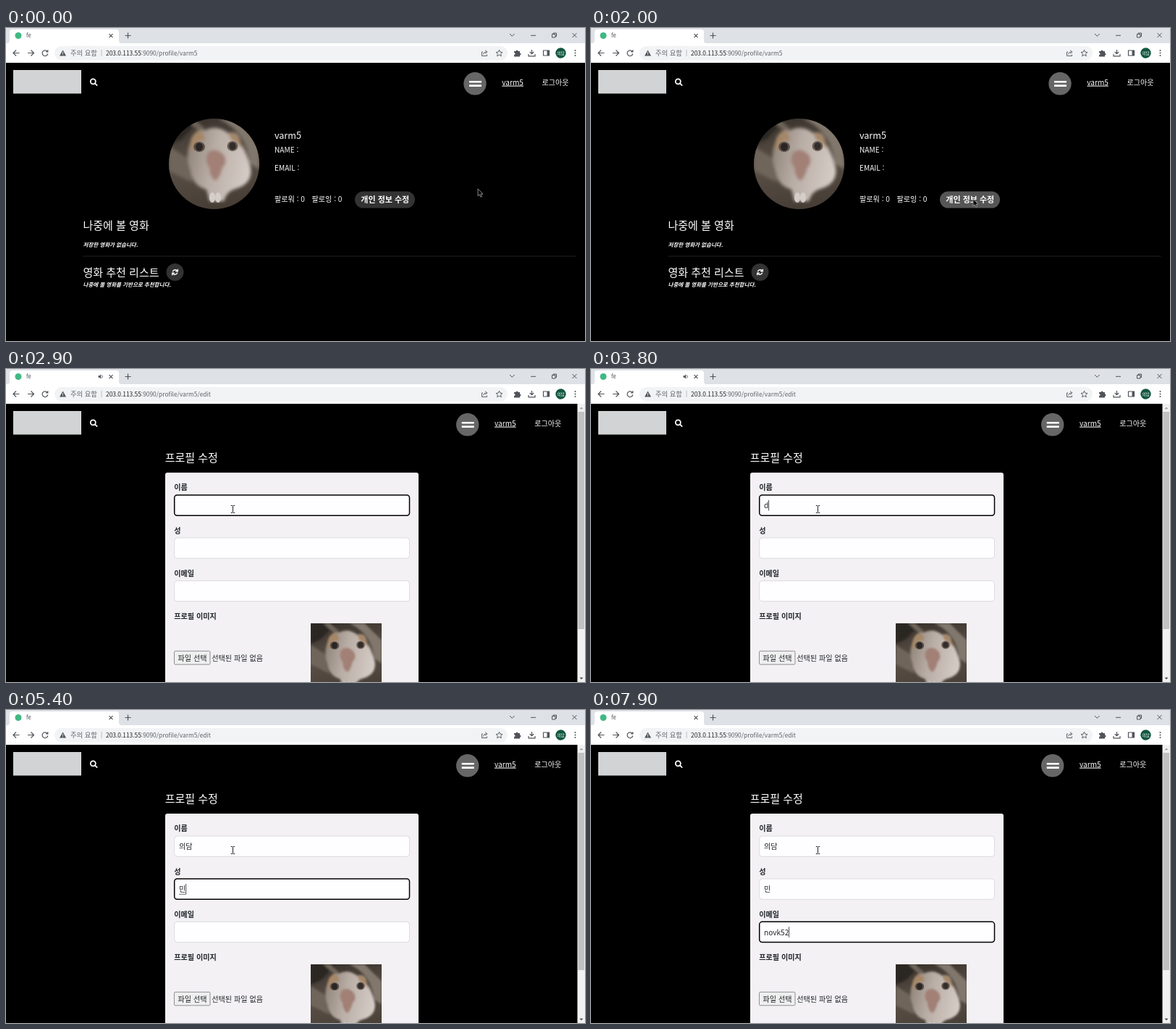
An HTML page for the animation above (8 s loop, 800 by 432 pixels).

```html
<!DOCTYPE html>
<html lang="ko">
<head>
<meta charset="utf-8">
<title>Profile edit</title>
<style>
  html, body { margin: 0; width: 100%; height: 100%; overflow: hidden; background: #000; }
  svg { display: block; width: 100vw; height: 100vh; }
  text { font: 10.1px "Noto Sans CJK KR", "Noto Sans CJK JP", "Noto Sans", sans-serif; white-space: pre; }
  .page { fill: #fff; }
  .page text { font-weight: 500; }
  .page .h { font-size: 15px; }
  .page .name { font-size: 12.6px; }
  .page .note { font-size: 7.5px; font-style: italic; font-weight: 700; }
  .page .btn { font-size: 11px; font-weight: 700; }
  .form { fill: #212529; }
  .form .label { font-weight: 700; }
  .ui { fill: none; stroke: #50545a; stroke-width: 1.2; }
  .ui .soft { stroke: #b0b3b7; }
  .ui .dot { fill: #50545a; stroke: none; }
  .field { fill: #fefdff; stroke: #d3d3d7; stroke-width: .8; }
  .field.on { stroke: #000; stroke-width: 1.5; }
</style>
</head>
<body>
<svg viewBox="0 0 800 432" preserveAspectRatio="none">
  <defs>
    <linearGradient id="room" x1=".3" y1="0" x2=".5" y2="1">
      <stop offset="0" stop-color="#3a332d"/>
      <stop offset=".45" stop-color="#5a5047"/>
      <stop offset="1" stop-color="#463d35"/>
    </linearGradient>
    <linearGradient id="fur" x1="0" y1=".35" x2="1" y2=".6">
      <stop offset="0" stop-color="#93877d"/>
      <stop offset=".4" stop-color="#b9aea6"/>
      <stop offset="1" stop-color="#d6cdc7"/>
    </linearGradient>
    <filter id="soft" x="-20%" y="-20%" width="140%" height="140%"><feGaussianBlur stdDeviation="2"/></filter>
    <clipPath id="round"><circle cx="62.5" cy="62.5" r="62.5"/></clipPath>
    <clipPath id="square"><path d="M0 0h125v125H0z"/></clipPath>

    <g id="photo">
      <path fill="url(#room)" d="M0 0h125v125H0z"/>
      <g filter="url(#soft)">
        <path fill="#81776c" d="M68 0Q108 18 112 62L125 70V30L95 0z"/>
        <path fill="#6f655a" d="M0 38L28 56L32 88L0 72z"/>
        <path fill="#2c2621" d="M0 0H44L18 28L0 36z"/>
        <path fill="#6f655a" d="M22 0L42 18L50 14L34 0z"/>
        <path fill="url(#fur)" d="M30 32Q34 14 50 16Q66 8 82 20Q97 16 99 34Q108 48 113 68Q116 90 92 97Q80 100 76 114H56L52 98Q32 92 30 72Q22 52 30 32z"/>
        <path fill="#a58768" d="M29 44Q28 22 42 17Q50 20 50 30Q38 30 36 42zM82 20Q98 16 101 42Q96 34 86 30z"/>
        <path fill="#a28076" d="M54 47Q64 38 76 50Q82 60 74 68Q70 84 64 86Q56 80 56 68Q48 58 54 47z"/>
      </g>
      <ellipse cx="42" cy="39" rx="8" ry="7" fill="#5b514a"/>
      <ellipse cx="88" cy="38" rx="7.5" ry="7" fill="#6b5f57"/>
      <ellipse cx="42" cy="39" rx="5" ry="5.5" fill="#2b2623"/>
      <ellipse cx="88" cy="38" rx="4.8" ry="5.2" fill="#332d2a"/>
      <ellipse cx="60" cy="109" rx="4" ry="7" fill="#d5cec8"/>
      <ellipse cx="68" cy="109" rx="4" ry="7" fill="#d5cec8"/>
    </g>
  </defs>

  <!-- browser window -->
  <path fill="#dee1e6" d="M0 0h800v21H0z"/>
  <path fill="#fff" d="M0 21H2Q5 21 5 17V6Q5 2 9 2H152Q156 2 156 6V17Q156 21 159 21H800V48H0z"/>
  <rect x="67" y="25" width="626" height="19.5" rx="9.7" fill="#f1f3f4"/>
  <circle cx="17" cy="10.5" r="4.5" fill="#41b883"/>
  <text x="28" y="13.3" fill="#45494d" style="font-size:7.6px">fe</text>
  <g class="ui">
    <path d="M142.500 8.200l5 5m0-5l-5 5M168.500 6.500v8m-4-4h8"/>
    <path stroke-width="1" d="M696 8l3.300 3.300L702.600 8M725 10.300h7M754.500 8.500h4.500v4.500h-4.500zM756 8.500V7h4.500v4.500H759M782.500 7l6 6m0-6l-6 6"/>
    <path d="M18.500 34.500h-8.500m4-4l-4 4l4 4M57 32.200A3.900 3.900 0 1 0 57.800 35.500M57.800 30.300v2.600h-2.600M30 34.500h8.500m-4-4l4 4l-4 4"/>
    <path class="dot" d="M78.500 30.500L83 38.500H74z"/>
    <path stroke="#f1f3f4" stroke-width="1" d="M78.500 33.300v2.300m0 .7v1"/>
    <path class="soft" stroke-width=".8" d="M132 30v9"/>
    <path stroke-width=".9" d="M659 33h-1.500v5.500h7V36.500M659.500 36.500q.5-3.500 4-3.500m-1.500-2.200l3 2.200l-3 2.200"/>
    <path stroke-width=".9" d="M681.500 30.200l1.300 3l3.200.3l-2.400 2.100l.7 3.200l-2.800-1.700l-2.800 1.700l.7-3.200l-2.400-2.100l3.200-.3z"/>
    <path class="dot" d="M702 32h2.500a1.500 1.500 0 0 1 3 0h2.500v2.500a1.500 1.500 0 0 1 0 3V39.500h-8v-2.500a1.500 1.500 0 0 0 0-3z"/>
    <path d="M726.500 30v5.500m-2.700-2.500l2.700 2.700l2.700-2.700M722 36v2.800h9V36"/>
    <path d="M742.500 31h8v7h-8z"/>
    <path class="dot" d="M747.500 31h3v7h-3z"/>
    <g class="dot"><circle cx="786.500" cy="31" r="1"/><circle cx="786.500" cy="34.500" r="1"/><circle cx="786.500" cy="38" r="1"/></g>
    <g id="sound">
      <path class="dot" d="M127.500 9.200h1.700l2-1.900v6.400l-2-1.900h-1.700z"/>
      <path stroke-width=".9" d="M132.500 8.500q1.800 2 0 4"/>
    </g>
  </g>
  <circle cx="766.500" cy="34.500" r="7.200" fill="#12573f"/>
  <text x="766.500" y="36.700" fill="#fff" text-anchor="middle" style="font-size:5.800px">의담</text>
  <text x="89" y="38" fill="#5f6368" style="font-size:9.300px">주의 요함</text>
  <text x="138" y="37.700" fill="#5f6368" style="font-size:8.400px"><tspan fill="#202124">203.0.113.55</tspan>:9090/profile/varm5<tspan id="path">/edit</tspan></text>

  <!-- shared header -->
  <path d="M0 48h800V432H0z"/>
  <rect x="10" y="58" width="94" height="32.500" fill="#d1d3d4"/>
  <g fill="none" stroke="#fff" stroke-width="1.800">
    <circle cx="120.300" cy="73.800" r="3.500"/><path d="M122.900 76.400l3.200 3.200"/>
  </g>
  <g id="nav" class="page">
    <circle cx="648" cy="76.800" r="15.700" fill="#666"/>
    <path d="M640 73h17v2.600h-17zM640 78.300h17v2.600h-17z"/>
    <text x="685.300" y="78.600" text-decoration="underline">varm5</text>
    <text x="740.500" y="78.600">로그아웃</text>
  </g>

  <g id="profile" class="page">
    <g transform="translate(225 125)" clip-path="url(#round)"><use href="#photo"/></g>
    <text class="name" x="371" y="152.800">varm5</text>
    <text x="371" y="171.700">NAME :</text>
    <text x="371" y="196.700">EMAIL :</text>
    <text x="371" y="239.700">팔로워 : 0</text>
    <text x="422.500" y="239.700">팔로잉 : 0</text>
    <rect id="editBtn" x="482" y="225.500" width="83" height="23" rx="11.500"/>
    <text class="btn" x="523.800" y="241" text-anchor="middle">개인 정보 수정</text>
    <text class="h" x="106.500" y="278">나중에 볼 영화</text>
    <text class="note" x="106.500" y="302">저장한 영화가 없습니다.</text>
    <path fill="#232323" d="M106.500 314.500h681v1h-681z"/>
    <text class="h" x="106.500" y="343">영화 추천 리스트</text>
    <circle cx="233.500" cy="337" r="12" fill="#333"/>
    <g fill="none" stroke="#fff" stroke-width="1.400">
      <path d="M230.200 336.300q1.300-3 4.300-2.500q1.200.3 2.200 1.600M236.800 337.700q-1.300 3-4.300 2.500q-1.200-.3-2.200-1.600"/>
      <path d="M237.300 332.800v3h-3M229.700 341.200v-3h3"/>
    </g>
    <text class="note" x="106.500" y="357">나중에 볼 영화를 기반으로 추천합니다.</text>
  </g>

  <g id="edit">
    <g class="page"><text class="h" x="219.700" y="127.700">프로필 수정</text></g>
    <rect x="220" y="143" width="350" height="300" rx="3" fill="#f3f1f4"/>
    <g class="form">
      <text class="label" x="232.300" y="167">이름</text>
      <text class="label" x="232.300" y="226.500">성</text>
      <text class="label" x="232.300" y="285.500">이메일</text>
      <text class="label" x="232.300" y="344.700">프로필 이미지</text>
      <g id="fields"></g>
      <path id="underline" fill="none" stroke="#333" stroke-width=".7"/>
      <path id="caret" fill="none" stroke="#222" stroke-width=".8"/>
      <rect x="232.500" y="389.300" width="49.500" height="18.500" rx="1.500" fill="#efefef" stroke="#767676" stroke-width=".8"/>
      <text x="237.500" y="402.600">파일 선택</text>
      <text x="284.300" y="402.600">선택된 파일 없음</text>
    </g>
    <g transform="translate(421 351) scale(.784)" clip-path="url(#square)"><use href="#photo"/></g>
    <path fill="#f1f1f1" d="M789.500 48H800V432H789.500z"/>
    <path fill="#c1c1c1" d="M790.500 59h8.500v300h-8.500z"/>
    <path fill="#a3a3a3" d="M792.500 55.300h5l-2.500-2.800z"/>
    <path fill="#505050" d="M792.500 425.700h5l-2.500 2.800z"/>
  </g>

  <path id="arrow" d="M0 0V9.800L2.300 7.700L3.900 11.300L5.500 10.600L3.900 7.100H7z" stroke="#aaa" stroke-width=".8"/>
  <path id="beam" fill="none" stroke="#222" stroke-width="1" d="M-2.700-5H-.8L0-4.300L.8-5H2.700M0-4.300V4.300M-2.700 5H-.8L0 4.300L.8 5H2.700"/>
</svg>

<script>
const LOOP = 8000, STEP = 100, OPEN = 2100;
const $ = id => document.getElementById(id);
const show = (id, on) => $(id).style.display = on ? '' : 'none';

// time, x, y of the pointer
const moves = [[1300, 652, 222], [1900, 528, 236], [2000, 528, 236], [2100, 531, 245], [2200, 500, 237], [2400, 313.5, 193.5]];

// time, field, value: wrong input mode first, then corrected
const typing = [
  [2400, 0, ''], [3100, 0, 'd'], [3300, 0, 'dm'], [3500, 0, 'dml'],
  [3700, 0, 'dm'], [3800, 0, 'd'], [4000, 0, ''],
  [4200, 0, 'ㅇ'], [4400, 0, '으'], [4600, 0, '의'], [4800, 0, '읟'], [4900, 0, '의다'], [5000, 0, '의담'],
  [5100, 1, ''], [5200, 1, 'ㅁ'], [5300, 1, '미'], [5400, 1, '민'],
  [5600, 2, ''], [5900, 2, 'ㄴ'], [6000, 2, '노'], [6200, 2, 'ㄴ'], [6300, 2, ''],
  [6600, 2, 'n'], [6700, 2, 'no'], [6800, 2, 'nov'], [6900, 2, 'novk'], [7300, 2, 'novk5'], [7600, 2, 'novk52']
];

const tops = [174, 233, 292.3];
$('fields').innerHTML = tops.map(y =>
  `<rect class="field" x="232.700" y="${y}" width="324.800" height="28.300" rx="3.800"/><text x="239" y="${y + 18.2}"></text>`).join('');
const boxes = [...document.querySelectorAll('.field')];
const values = boxes.map(box => box.nextElementSibling);

function pointerAt(t) {
  const i = moves.findIndex(m => m[0] > t);
  if (i === 0) return moves[0].slice(1);
  if (i < 0) return moves[moves.length - 1].slice(1);
  const [t0, x0, y0] = moves[i - 1], [t1, x1, y1] = moves[i];
  const p = (t - t0) / (t1 - t0), k = p * p * (3 - 2 * p);
  return [x0 + (x1 - x0) * k, y0 + (y1 - y0) * k];
}

function drawForm(t) {
  const done = typing.filter(e => e[0] <= t);
  const text = ['', '', ''];
  done.forEach(([, field, value]) => text[field] = value);
  const [since, active] = done[done.length - 1] || [0, -1];
  boxes.forEach((box, i) => {
    box.classList.toggle('on', i === active);
    if (values[i].textContent !== text[i]) values[i].textContent = text[i];
  });
  const focused = active >= 0;
  const composing = focused && /[ㄱ-힣]$/.test(text[active]);
  show('caret', focused && (t - since) % 1000 < 500);
  show('underline', composing);
  if (!focused) return;
  const y = tops[active];
  const end = 239 + (text[active] ? values[active].getComputedTextLength() : 0);
  $('caret').setAttribute('d', `M${end + .3} ${y + 7}v14.500`);
  $('underline').setAttribute('d', `M${end - 9.3} ${y + 21.3}h9.300`);
}

function draw(t) {
  const editing = t >= OPEN;
  const [x, y] = pointerAt(t);
  show('profile', !editing);
  show('edit', editing);
  show('path', editing);
  show('sound', t >= 2500 && t < 5300);
  show('arrow', !editing);
  show('beam', editing);
  $('nav').setAttribute('transform', `translate(${editing ? -10.3 : 0})`);
  $(editing ? 'beam' : 'arrow').setAttribute('transform', `translate(${x} ${y})`);
  const hover = x > 482 && x < 565 && y > 225 && y < 249;
  $('editBtn').setAttribute('fill', hover ? '#555' : '#333');
  if (editing) drawForm(t);
}

function tick() {
  const t = performance.now() % LOOP;
  draw(Math.floor(t / STEP) * STEP);
  requestAnimationFrame(tick);
}
tick();
</script>
</body>
</html>
```
